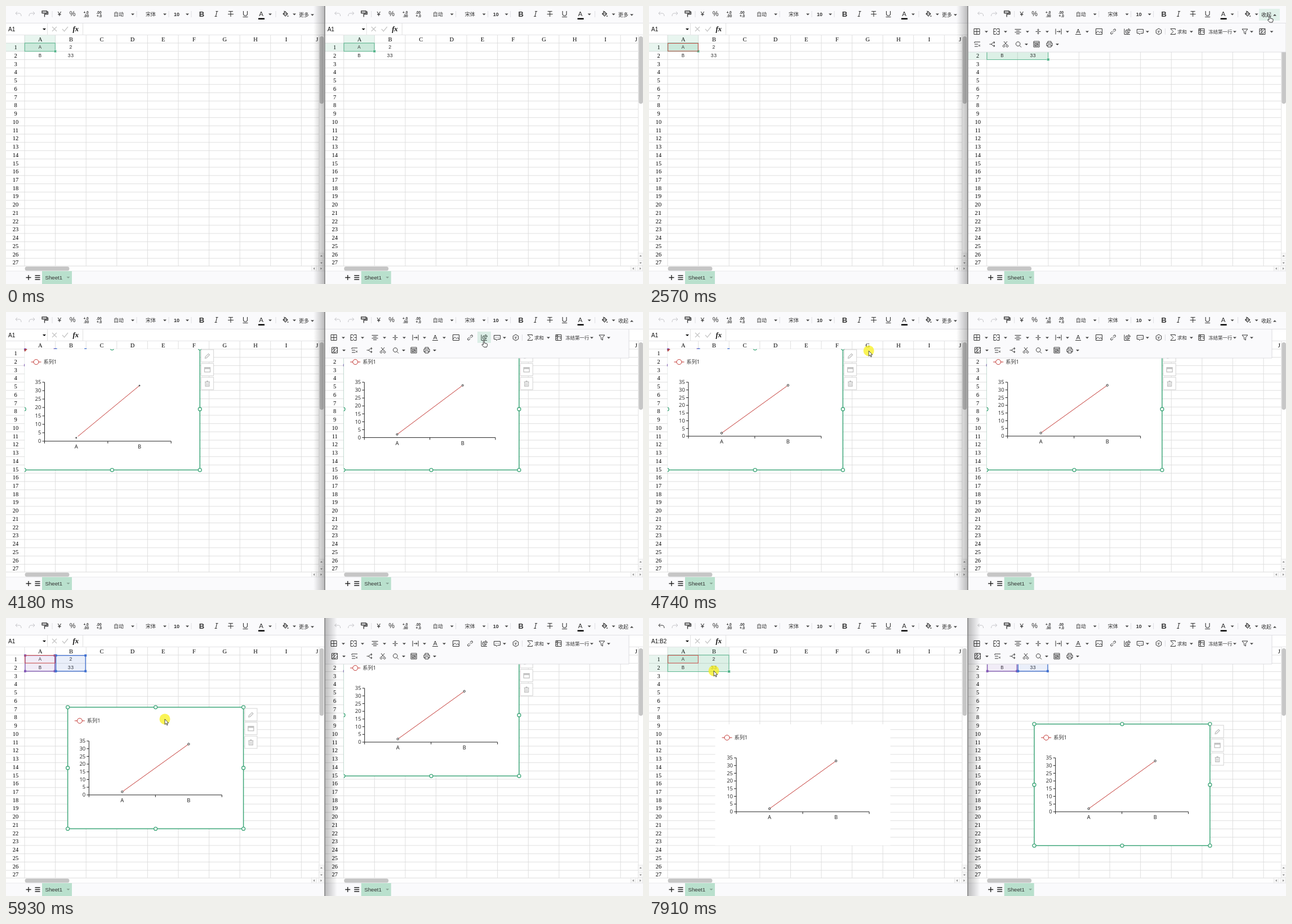
Recreate the animation shown at these times as an HTML page. Size 1131x495 px, loop 8000 ms.

```html
<!DOCTYPE html>
<html lang="zh">
<head>
<meta charset="utf-8">
<style>
html,body{margin:0;width:100%;height:100%;overflow:hidden;background:#fff}
svg{display:block;width:100%;height:100%}
text{white-space:pre}
.ui{font-family:"Liberation Sans",Arial,sans-serif}
.cjk{font-family:"Noto Sans CJK SC","Noto Sans CJK",sans-serif}
.serif{font-family:"Liberation Serif",serif}
.cell{font-family:"Liberation Mono",monospace}
.axis{font-family:"Noto Sans","Noto Sans CJK SC","Noto Sans CJK",sans-serif}
</style>
</head>
<body>
<svg id="stage" viewBox="0 0 1131 495" preserveAspectRatio="none"></svg>
<script>
const LOOP = 8000, PANEL = 566.7;
const X0 = 33, Y0 = 66, CW = 54.6, RH = 14.74;
const GREEN = '#3fa77a', RED = '#c23531', INK = '#333';
const T = {
  red: 940, menu: 2510, narrow: 2700, chartR: 3680, chartL: 3935,
  grab: 5540, undo: 6350, sync: 6420, clickC3: 6880, redC3: 7020, clickA1: 7420
};

const rect = (x, y, w, h, fill, extra = '') =>
  `<rect x="${x}" y="${y}" width="${w}" height="${h}" fill="${fill}" ${extra}/>`;
const path = (d, stroke = INK, w = 1, extra = 'fill="none"') =>
  `<path d="${d}" stroke="${stroke}" stroke-width="${w}" ${extra}/>`;
const text = (s, x, y, size, cls = 'ui', fill = INK, extra = '') =>
  `<text class="${cls}" x="${x}" y="${y}" font-size="${size}" fill="${fill}" ${extra}>${s}</text>`;
const mid = 'text-anchor="middle"';
const at = (x, y, s) => `<g transform="translate(${x} ${y})">${s}</g>`;
const icon = (x, y, d, c = INK, w = 1) => at(x, y, path(d, c, w));
const caret = (x, y, c = '#444', up = 1) =>
  `<path d="M${x - 3} ${y - 1.5 * up}h6l-3 ${3 * up}z" fill="${c}"/>`;
const circle = (x, y, r, fill, stroke = 'none', w = 1) =>
  `<circle cx="${x}" cy="${y}" r="${r}" fill="${fill}" stroke="${stroke}" stroke-width="${w}"/>`;

const UNDO = 'M-2-4L-5-1L-2 2M-5-1H1.5Q5-1 5 4';
const REDO = 'M2-4L5-1L2 2M5-1H-1.5Q-5-1-5 4';

function toolbar() {
  let s = rect(0, 0, 566, 30, '#fafafc') + path('M0 30.5H566', '#e0e0e4');
  s += icon(46, 14, REDO, '#c4c4c8') + icon(69, 14, 'M-5-5H3.5V-1.5H-5ZM3.5-3.5H5.5V.5H-.5V5.5', INK, 1.3);
  s += text('¥', 95, 18, 11.5, 'ui', INK, mid) + text('%', 118, 18.3, 12, 'ui', INK, mid);
  s += text('+.0', 142, 14, 6.5, 'ui', INK, mid + ' font-weight="bold"') + text('.00', 142.5, 19.5, 6.5, 'ui', INK, mid + ' font-weight="bold"');
  s += text('.00', 165, 14, 6.5, 'ui', INK, mid + ' font-weight="bold"') + text('+.0', 165.5, 19.5, 6.5, 'ui', INK, mid + ' font-weight="bold"');
  s += text('自动', 191, 17.5, 9, 'cjk') + text('宋体', 248, 17.5, 9, 'cjk');
  s += text('10', 303, 17.8, 9, 'ui', INK, mid + ' font-weight="bold"');
  s += text('B', 347.5, 19, 13, 'ui', INK, mid + ' font-weight="bold"');
  s += icon(373.5, 14, 'M-1-4.5H3M-3 4.5H1M1-4.5L-1 4.5', INK, 1.1);
  s += icon(399, 14, 'M-4-4.5H4M0-4.5V5M-5 .5H5', INK, 1.1);
  s += icon(425, 14, 'M-3.5-5V0A3.5 3.2 0 0 0 3.5 0V-5M-4.5 5.5H4.5', INK, 1.1);
  s += text('A', 453, 18, 11.5, 'ui', INK, mid) + rect(448, 21.5, 11, 2.5, '#000');
  s += icon(496, 14, 'M-4 0L0-4L4 0L0 4ZM-2.5-5L0-3M-4 0H4', INK, 1.1) + circle(500.5, 18, 1, INK);
  for (const x of [225, 282, 322, 469, 512]) s += caret(x, 15);
  for (const x of [82, 232, 289, 329, 479]) s += path(`M${x} 9V20`, '#dedee2');
  s += path('M0 51.5H566', '#e4e4e6') + path('M73.5 31V51M136.5 31V51', '#e0e0e0');
  s += caret(68, 41.5, '#000') + icon(86, 41, 'M-4-4L4 4M4-4L-4 4', '#c4c4c4', 1.2) + icon(105, 41, 'M-5 0L-1.5 4L5-4', '#c4c4c4', 1.2);
  return s + text('fx', 118.5, 45, 12.5, 'serif', '#111', 'font-style="italic" font-weight="bold"');
}

function sheet() {
  let d = 'M0 66H556M33 52V463';
  for (let i = 1; i <= 26; i++) d += `M0 ${Y0 + i * RH}H556`;
  for (let i = 1; i <= 9; i++) d += `M${X0 + i * CW} 52V463`;
  let s = path(d, '#dcdcdc', .9);
  for (let i = 0; i < 27; i++) s += text(i + 1, 17, Y0 + (i + .5) * RH + 3.8, 10.5, 'serif', '#000', mid);
  for (let i = 0; i < 10; i++) s += text('ABCDEFGHIJ'[i], X0 + (i + .5) * CW + .5, 62.8, 10.5, 'serif', '#000', mid);
  s += rect(556, 52, 10, 420, '#fff') + path('M556 52V463', '#e2e2e2') + rect(0, 463, 566, 9, '#fff') + path('M0 463H556', '#dcdcdc');
  s += rect(556.7, 54, 7.5, 120, '#c6c6c6', 'rx="3.7"') + rect(33.5, 464, 79, 7.5, '#c6c6c6', 'rx="3.7"');
  for (const [x, y, p] of [[560, 445, 'M-2 1h4l-2-2.5z'], [560, 457.5, 'M-2-1h4l-2 2.5z'], [547, 467.5, 'M1-2v4l-2.5-2z'], [559.5, 467.5, 'M-1-2v4l2.5-2z']])
    s += rect(x - 4.5, y - 5, 9, 10, '#f7f7f7', 'stroke="#e2e2e2" stroke-width=".7"') + at(x, y, `<path d="${p}" fill="#888"/>`);
  s += rect(0, 472, 566, 23, '#fafafc') + path('M0 472H566', '#e4e4e6', .8);
  s += icon(40, 483.5, 'M-4.5 0H4.5M0-4.5V4.5', '#222', 1.4) + icon(56, 483.5, 'M-4.5-3.5H4.5M-4.5 0H4.5M-4.5 3.5H4.5', '#222', 1.3);
  return s + rect(64, 472, 53, 23, '#b9e0cd') + text('Sheet1', 69.5, 487.3, 9.7) + caret(110.5, 483.5, '#8aa597');
}

const COND = 'M-5-5H5V5H-5ZM-5 0L0-5M-5 5L5-5M0 5L5 0M-1-5V5';
function menu(wide) {
  const right = wide ? 1131 : 1106, off = wide ? 0 : 36;
  let s = rect(567, 31, right - 567, 51, '#fafafc') + path(`M567 82H${right}V31`, '#dcdce0');
  const row1 = [
    [582, 'M-5-5H5V5H-5ZM-5 0H5M0-5V5'], [617, 'M-1-5H-5V5H-1M1-5H5V5H1M-5 0H-1.5M5 0H1.5M0-5V-2M0 5V2'],
    [655, 'M-5.5-4H5.5M-3-1.3H3M-5.5 1.3H5.5M-3 4H3'], [691, 'M-4.5 0H4.5M0-5V-2M-1.5-3L0-1.5L1.5-3M0 5V2M-1.5 3L0 1.5L1.5 3'],
    [727, 'M-5-5V5M5-5V5M-3 0H3M1-2L3 0L1 2'], [762, 'M-3 3L0-4.5L3 3M-2 .7H2M-5 5H5'],
    [799, 'M-5.5-5H5.5V5H-5.5ZM-5.5 3L-2-1L1 2L3 0L5.5 3'], [824, 'M-1 1L1-1M0-2L2-4.5Q5-5 4.5-2L2 0M0 2L-2 4.5Q-5 5-4.5 2L-2 0'],
    [849, 'M-5-5V5H5M4 1A3.5 3.5 0 1 1 0-3.5V1ZM2-5A4 4 0 0 1 5.5-1.5H2Z'], [872, 'M-5.5-4H5.5V3H1L-1 5L-2 3H-5.5ZM-3-.5H-2M-.5-.5H.5M2-.5H3'],
    [905, 'M0-5.5L4.7-2.7V2.7L0 5.5L-4.7 2.7V-2.7ZM-2-1.5L0 0L2-1.5M0 0V3'], [930, 'M4.5-3V-5H-4L1 0L-4 5H4.5V3'],
    [981, 'M-5-5H5V5H-5ZM-5-1.7H5M-1.7-5V5M-5-1.7L-1.7-5M-5 3L-1.7 0M2 1H5'], [1058, 'M-5-4.5H5L1.3 0V4.5L-1.3 3V0Z']];
  for (const [x, d] of row1) s += icon(x, 45.5, d);
  for (const x of [599, 633, 672, 707, 743, 778, 885, 963, 1040, 1070]) s += caret(x, 46);
  s += path('M916.5 40V51', '#dedee2') + text('求和', 938, 48.6, 8.5, 'cjk') + text('冻结第一行', 993.5, 48.6, 8.4, 'cjk');
  const [cx, cy] = wide ? [1089, 45.5] : [583.5, 68];
  s += icon(cx, cy, COND) + caret(cx + 16.5, cy + .5);
  const row2 = [
    [583, 'M-5-4H5M-5 0H1M-5 4H1M5 1L2 4M2 1L5 4M-5-4V-2'], [609, 'M-4.5 0H-1L2-3H4M-1 0L2 3H4M3-5L5-3L3-1M3 1L5 3L3 5'],
    [633, 'M-3-5L3 2M3-5L-3 2M-3 1.5A1.8 1.8 0 1 0-2.9 1.5M3 1.5A1.8 1.8 0 1 0 3.1 1.5'], [656, 'M3-.5A3.8 3.8 0 1 0 3-.4M2 2.5L5 5.5'],
    [688, 'M-5-5H5V5H-5ZM-5-2.5H5M-3-.5H3V3H-3ZM-3 3L3-.5'], [711, 'M-3-2V-5H3V-2M-3 3H-5V-2H5V3H3M-3 1H3V5H-3Z']];
  for (const [x, d] of row2) s += icon(x + off, 68, d);
  return s + caret(670 + off, 68.5) + caret(725 + off, 68.5);
}

function selection(c1, r1) {
  const w = (c1 + 1) * CW, h = (r1 + 1) * RH, tint = 'rgba(70,175,125,';
  return rect(X0, 52, w, 14, tint + '.12)') + rect(0, Y0, X0, h, tint + '.12)') +
    rect(X0, Y0, w, h, tint + '.19)') + rect(X0, Y0, CW, RH, tint + '.11)') +
    rect(X0 + .3, Y0, w - .6, h, 'none', 'stroke="#5cb890"') + rect(X0 + w - 2.5, Y0 + h - 2.5, 4.6, 4.6, '#4fb288', 'stroke="#fff" stroke-width=".5"');
}
function selectC3() {
  const x = X0 + 2 * CW, y = Y0 + 2 * RH, tint = 'rgba(70,175,125,';
  return rect(x, 52, CW, 14, tint + '.12)') + rect(0, y, X0, RH, tint + '.12)') +
    rect(x, y, CW, RH, tint + '.28)', 'stroke="#5cb890"') + rect(x + CW - 2.5, y + RH - 2.5, 4.6, 4.6, '#4fb288');
}
const redCell = (c, r) => rect(X0 + c * CW + .7, Y0 + r * RH + .5, CW - 1, RH - 1, 'none', 'stroke="#d0504c"');

function ranges() {
  return [['#8258b5', '130,80,180'], ['#3f6fd0', '70,110,210']].map(([c, rgb], i) => {
    const x = X0 + i * CW + 1, h = 2 * RH - 1.5;
    let s = rect(x, Y0 + .7, CW - 2, h, `rgba(${rgb},.11)`, `stroke="${c}" stroke-width="1.3"`);
    for (const [a, b] of [[0, 0], [1, 0], [0, 1], [1, 1]]) s += rect(x - 2 + a * (CW - 2), Y0 - 1.3 + b * h, 4, 4, c);
    return s;
  }).join('');
}

function cellText() {
  return [['A', 0, 0], ['2', 1, 0], ['B', 0, 1], ['33', 1, 1]]
    .map(([s, c, r]) => text(s, X0 + (c + .5) * CW, Y0 + (r + .5) * RH + 3, 8.8, 'cell', INK, mid)).join('');
}

// k runs from 1 to 0 while the axes settle
function chart([dx, dy], k, selected, clip) {
  const x1 = 70 - 3.5 * k, x2 = 306 - 30 * k, y1 = 125, y2 = 221 + 21 * k;
  const px = i => x1 + (x2 - x1) * (.25 + .5 * i), py = v => y2 - (y2 - y1) * v / 35;
  let s = rect(32.5, 65.3, 311, 215.5, '#fff');
  s += path('M44.5 89H62.5', RED) + circle(53.5, 89, 4.5, '#fff', RED) + text('系列1', 66.5, 92, 9.2, 'axis');
  let d = `M${x1} ${y1}V${y2}H${x2}`;
  for (let v = 0; v <= 35; v += 5) {
    d += `M${x1} ${py(v)}h-4`;
    s += text(v, x1 - 6, py(v) + 3.2, 9.5, 'axis', INK, 'text-anchor="end"');
  }
  for (let i = 0; i < 3; i++) d += `M${x1 + (x2 - x1) * i / 2} ${y2}v4`;
  s += path(d, '#222') + `<g clip-path="url(#plot)">${path(`M${px(0)} ${py(2)}L${px(1)} ${py(33)}`, RED)}</g>`;
  [2, 33].forEach((v, i) => {
    s += circle(px(i), py(v), 1.7 * (1 - k), '#fff', '#222', 1);
    s += text('AB'[i], px(i), y2 + 13, 9.3, 'axis', '#222', mid);
  });
  if (selected) {
    s += rect(32.3, 64.8, 312, 216.5, 'none', `stroke="${GREEN}" stroke-width="1.5"`);
    for (const x of [0, 156, 312]) for (const y of [0, 108.2, 216.5])
      if (x != 156 || y != 108.2) s += circle(32.3 + x, 64.8 + y, 3, '#fff', GREEN, 1.3);
    const tools = ['M-4 4L-3.5 1.5L2-4L4-2L-1.5 3.5Z', 'M-5-4H5V4H-5ZM-5-2H5M-5-3H5', 'M-4.5-3H4.5M-1.5-4.5H1.5M-3.5-2.5V4.5H3.5V-2.5M-1.2-1V3M1.2-1V3'];
    tools.forEach((p, i) => {
      s += rect(346.6, 67 + i * 24.6, 22, 22, '#fff', 'stroke="#d4d4d4"') + icon(357.5, 78.3 + i * 24.6, p, '#c0c0c0', 1.3);
    });
  }
  return `<g clip-path="url(#cells)">${at(dx, dy, s)}</g>`;
}

const ease = u => u * u * (3 - 2 * u);
function track(keys, t) {
  if (t <= keys[0][0]) return keys[0].slice(1);
  for (let i = 1; i < keys.length; i++) {
    const a = keys[i - 1], b = keys[i];
    if (t < b[0]) {
      const u = ease((t - a[0]) / (b[0] - a[0]));
      return [a[1] + (b[1] - a[1]) * u, a[2] + (b[2] - a[2]) * u];
    }
  }
  return keys[keys.length - 1].slice(1);
}
const POINTER = [
  [270, 520, 436], [900, 628, 76], [1080, 628, 76], [1450, 667, 82], [1690, 667, 82], [2420, 1102, 17],
  [2700, 1102, 17], [3260, 848.5, 50.5], [4230, 848.5, 50.5], [5020, 206.5, 76.5], [5200, 206.5, 76.5],
  [5380, 202.5, 79.5], [5540, 202.5, 79.5], [5930, 282, 180], [6140, 288, 204], [6400, 288, 204], [6850, 170, 103],
  [7020, 170, 103], [7350, 60, 74], [7500, 60, 74], [7770, 84, 86], [7900, 115, 94]];
const DRAG = [[T.grab, 0, 0], [5930, 77.3, 94], [6140, 85, 124]];
const settle = (t, start) => Math.pow(1 - Math.min(1, Math.max(0, (t - start) / 1000)), 3);

function pointer(x, y, kind) {
  if (kind == 'hand') return at(x, y, path('M-1 1Q0-1 1 1V5L5.5 6Q6.5 6.5 6 9L5 12H0L-3.5 8Q-3.5 6-1 7.5Z', '#222', .9, 'fill="#fff"'));
  const halo = circle(x, y, 9.5, 'rgba(248,240,30,.75)');
  if (kind == 'move') return halo + icon(x, y, 'M-5 0H5M0-5V5M-1.5-3.5L0-5.5L1.5-3.5M-1.5 3.5L0 5.5L1.5 3.5M-3.5-1.5L-5.5 0L-3.5 1.5M3.5-1.5L5.5 0L3.5 1.5', '#444', .9);
  return halo + at(x, y, path('M0 0V9.5L2.2 7.5L3.8 11L5.2 10.3L3.7 7H6.6Z', '#222', .8, 'fill="#fff"'));
}

const stage = document.getElementById('stage');
stage.innerHTML = `<defs>
  <clipPath id="cells"><rect x="33" y="66" width="523" height="397"/></clipPath>
  <clipPath id="plot"><rect x="60" y="120" width="250" height="101.5"/></clipPath>
  <linearGradient id="fadeL"><stop offset="0" stop-opacity="0"/><stop offset="1" stop-opacity=".26"/></linearGradient>
  <linearGradient id="fadeR"><stop offset="0" stop-opacity=".26"/><stop offset="1" stop-opacity="0"/></linearGradient>
  </defs>${rect(0, 0, 1131, 495, '#fff')}` +
  [0, PANEL].map((x, i) => at(x, 0, toolbar() + sheet() + `<g id="panel${i}"></g>`)).join('') +
  `<g id="wide">${menu(true)}</g><g id="slim">${menu(false)}</g><g id="top"></g>`;
const $ = id => document.getElementById(id);

function more(x, open, hover) {
  return (hover ? rect(x - 4, 5, 37, 21, '#e1f1ea') : '') +
    text(open ? '收起' : '更多', x, 18.5, 9, 'cjk') + caret(x + 24, 16, '#444', open ? -1 : 1);
}

function draw(t) {
  const [x, y] = track(POINTER, t);
  const open = t >= T.menu, cell = (px, py) => [Math.floor((px - X0) / CW), Math.floor((py - Y0) / RH)];
  const label = ([c, r]) => c || r ? 'A1:' + 'AB'[c] + (r + 1) : 'A1';
  const hoverMore = x > 1083 && x < 1120 && y < 27;
  const hoverChart = open && x > 837 && x < 861 && y > 35 && y < 56;

  let left = '', name = 'A1';
  const picked = t >= T.chartL && t < T.clickC3;
  if (t < T.chartL) left += selection(0, 0);
  else if (t >= T.clickA1) {
    const c = cell(x, Math.min(y, 95));
    left += selection(...c);
    name = label(c);
  } else if (!picked) { left += selectC3(); name = 'C3'; }
  left += cellText();
  if (picked) left += ranges();
  if (t >= T.red) left += redCell(0, 0);
  if (t >= T.chartL) left += chart(track(DRAG, t), settle(t, T.chartL), picked);
  if (picked && t < T.grab) left += '<path d="M33 66h5l-5 5z" fill="#b5473f"/>';
  left += text(name, 4, 44.8, 10, 'ui', '#111') + icon(22, 14, UNDO, t >= T.undo ? INK : '#c4c4c8') + more(520, false, false);
  $('panel0').innerHTML = left;

  let right = '', span = [0, 0];
  if (t >= 1080) span = t < 1490 ? cell(x - PANEL, y) : [1, 1];
  if (t < T.chartR) right += selection(...span);
  right += cellText();
  if (t >= T.chartR) right += ranges();
  if (t >= T.redC3 && t < T.clickA1 + 70) right += redCell(2, 2);
  if (t >= T.chartR) right += chart(t < T.sync ? [0, 0] : [85, 124], settle(t, T.chartR), true);
  right += text(label(span), 4, 44.8, 10, 'ui', '#111') + icon(22, 14, UNDO, '#c4c4c8') + more(520.3, open, hoverMore);
  $('panel1').innerHTML = right;

  $('wide').style.display = open && t < T.narrow ? '' : 'none';
  $('slim').style.display = t >= T.narrow ? '' : 'none';

  let top = t < T.grab ? rect(546, 0, 20, 495, 'url(#fadeL)') : rect(566, 0, 22, 495, 'url(#fadeR)');
  top += path('M566 0V495', '#777', 1.4);
  if (hoverChart) top += rect(837, 35, 24, 20, 'rgba(70,175,125,.17)');
  if (t >= 270) {
    const overMenu = open && x > 567 && y > 31 && y < 82;
    const kind = hoverMore || overMenu ? 'hand' : t > T.chartL && t < T.grab && x < 344 && y > 66 ? 'move' : 'arrow';
    top += pointer(x, y, kind);
  }
  $('top').innerHTML = top;
}

const start = performance.now();
function tick() {
  draw((performance.now() - start) % LOOP);
  requestAnimationFrame(tick);
}
tick();
</script>
</body>
</html>
```
